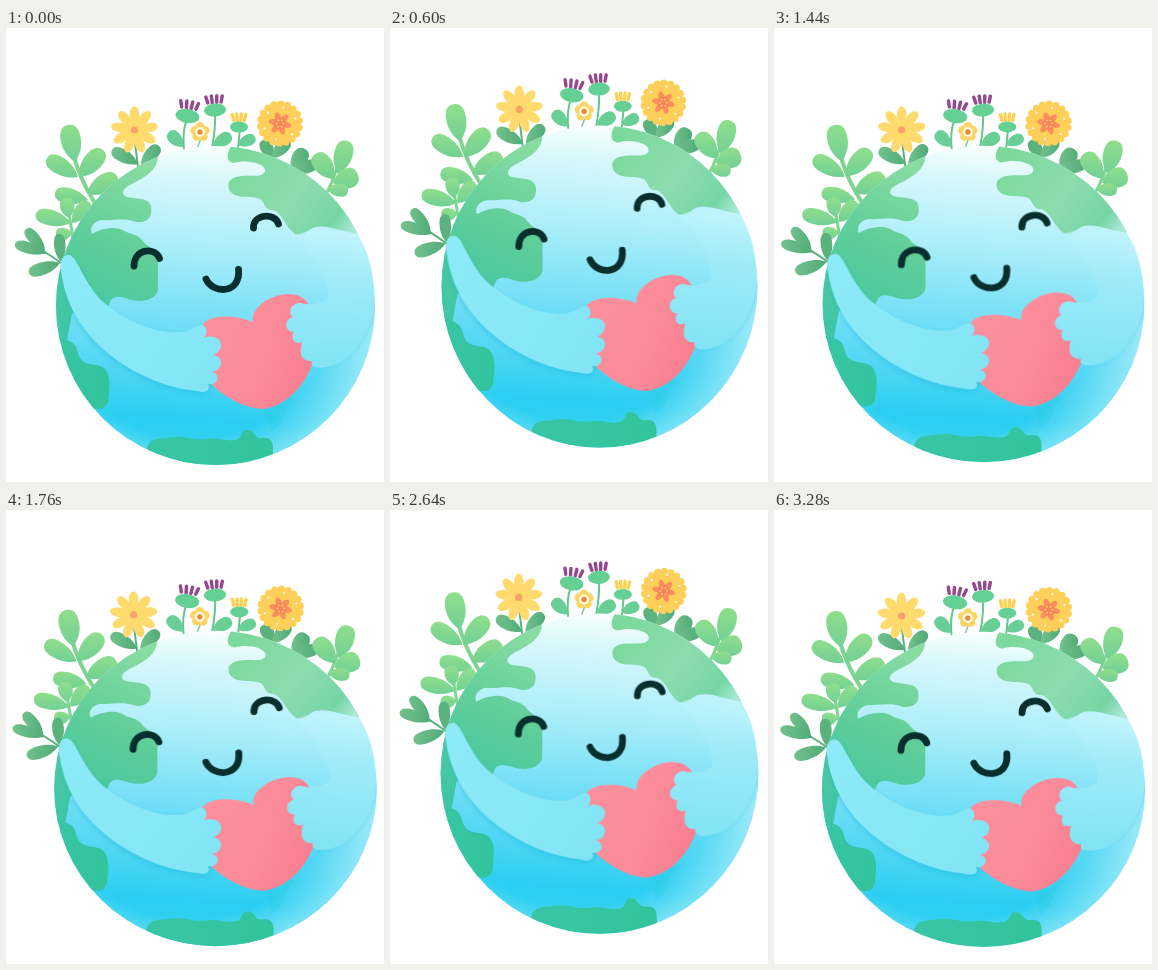
An HTML page for the animation above (3320 ms loop, 378 px wide and 454 px high).

```html
<!DOCTYPE html>
<html lang="en">
<head>
<meta charset="utf-8">
<title>Happy planet</title>
<style>
html, body { margin: 0; width: 100%; height: 100%; overflow: hidden; background: #fff; }
svg { display: block; width: 100vw; height: 100vh; }
</style>
</head>
<body>
<svg viewBox="0 0 378 454">
  <defs>
    <linearGradient id="sea" gradientUnits="userSpaceOnUse" x1="222" y1="118" x2="202" y2="437">
      <stop offset="0" stop-color="#fafffe"/>
      <stop offset=".1" stop-color="#d9f8fb"/>
      <stop offset=".3" stop-color="#b0effa"/>
      <stop offset=".5" stop-color="#80e2f7"/>
      <stop offset=".7" stop-color="#54d7f4"/>
      <stop offset=".86" stop-color="#2bcef1"/>
      <stop offset="1" stop-color="#35d2f1"/>
    </linearGradient>
    <radialGradient id="rim" gradientUnits="userSpaceOnUse" cx="186" cy="258" r="190">
      <stop offset=".8" stop-color="#d8fafd" stop-opacity="0"/>
      <stop offset="1" stop-color="#d8fafd" stop-opacity=".45"/>
    </radialGradient>
    <linearGradient id="westLand" gradientUnits="userSpaceOnUse" x1="140" y1="140" x2="65" y2="300">
      <stop offset="0" stop-color="#88dca2"/>
      <stop offset=".5" stop-color="#5dcd99"/>
      <stop offset="1" stop-color="#40c6a4"/>
    </linearGradient>
    <linearGradient id="eastLand" gradientUnits="userSpaceOnUse" x1="235" y1="130" x2="338" y2="212">
      <stop offset="0" stop-color="#7cd99c"/>
      <stop offset=".5" stop-color="#8cdcb0"/>
      <stop offset=".85" stop-color="#76d5a4"/>
      <stop offset="1" stop-color="#a8e8d4"/>
    </linearGradient>
    <linearGradient id="southLand" x1="0" x2="1" y1="0" y2="0">
      <stop offset="0" stop-color="#39c5a5"/>
      <stop offset="1" stop-color="#32c49d"/>
    </linearGradient>
    <linearGradient id="leftArmFill" gradientUnits="userSpaceOnUse" x1="55" y1="230" x2="210" y2="350">
      <stop offset="0" stop-color="#8eebf8"/>
      <stop offset="1" stop-color="#82e5f6"/>
    </linearGradient>
    <linearGradient id="rightArmFill" gradientUnits="userSpaceOnUse" x1="325" y1="203" x2="318" y2="335">
      <stop offset="0" stop-color="#c4f4fb" stop-opacity=".6"/>
      <stop offset=".35" stop-color="#a0ebf9"/>
      <stop offset="1" stop-color="#82e4f5"/>
    </linearGradient>
    <linearGradient id="love" gradientUnits="userSpaceOnUse" x1="215" y1="310" x2="300" y2="345">
      <stop offset="0" stop-color="#fd8f9c"/>
      <stop offset=".5" stop-color="#fc8b9a"/>
      <stop offset="1" stop-color="#f88091"/>
    </linearGradient>
    <linearGradient id="leaf" x1="0" x2="0" y1="0" y2="1">
      <stop offset="0" stop-color="#90de8c"/>
      <stop offset="1" stop-color="#72d095"/>
    </linearGradient>
    <linearGradient id="darkLeaf" x1="0" x2="1" y1="0" y2="0">
      <stop offset="0" stop-color="#73c18c"/>
      <stop offset="1" stop-color="#50ab79"/>
    </linearGradient>
    <filter id="blur" x="-20%" y="-20%" width="140%" height="140%"><feGaussianBlur stdDeviation="2.5"/></filter>
    <clipPath id="globe"><circle cx="209.5" cy="277.5" r="159.5"/></clipPath>
    <path id="leftArm" d="M55 243C53 231 58 226 64 227C72 231 76 251 94 271C118 293 151 307 177 304C186 302 190 296 197 297C202 300 201 306 198 310C207 306 216 311 215 318C214 323 211 325 207 327C215 328 217 335 213 340C211 343 208 343 205 344C213 345 213 352 209 355C206 357 204 356 202 356C205 362 200 366 191 363C149 359 109 336 85 309C67 289 58 266 55 243Z"/>
    <path id="rightArm" d="M290 207C306 199 334 202 349 206C360 213 369 243 368 277C367 301 348 331 328 337C314 342 303 340 306 333C295 333 293 326 296 314C289 317 284 312 288 304C278 304 278 291 287 289C281 284 286 274 295 275C303 278 314 276 322 271C326 255 310 230 290 207Z"/>
  </defs>
  <g id="planet">
    <g id="plants"></g>
    <circle cx="209.5" cy="277.5" r="159.5" fill="url(#sea)"/>
    <g clip-path="url(#globe)">
      <circle cx="209.5" cy="277.5" r="159.5" fill="url(#rim)"/>
      <path fill="url(#westLand)" d="M60 130L150 112C155 135 151 143 128 155C119 159 114 164 119 168C126 172 142 168 145 178C147 190 141 195 130 194C117 189 108 193 96 192C87 193 83 201 86 206C95 200 110 198 117 202C124 207 130 205 136 212C142 221 151 219 152 232L152 262C149 273 134 275 122 271C108 266 104 270 102 281L66 285L61 313H40V130Z"/>
      <path fill="url(#southLand)" d="M40 306L54 310C66 313 70 315 72 325C76 340 90 334 98 340C105 347 104 358 102 374C98 385 88 380 78 379L40 360Z"/>
      <path fill="url(#eastLand)" d="M231 110C219 124 219 134 228 135C240 131 260 135 259 143C257 150 246 147 236 148C223 149 220 156 224 163C231 172 246 167 254 171C260 175 257 182 267 182C276 185 279 199 289 206C298 210 301 201 309 199C323 196 337 205 356 206L345 130Z"/>
      <path fill="url(#southLand)" d="M141 440V420C144 408 157 411 169 409C181 408 187 413 201 411C214 409 222 415 232 411C237 407 235 401 242 402C250 403 248 411 256 410C263 409 267 412 267 420V440Z"/>
      <path fill="#22c8df" opacity=".28" d="M254 365C256 390 266 390 265 405C281 394 275 384 289 370Z"/>
      <g fill="#18b3d8" opacity=".35" filter="url(#blur)">
        <use href="#leftArm" y="3"/>
        <path d="M305 336C338 342 366 309 370 274L345 260Z"/>
      </g>
    </g>
    <path fill="url(#love)" d="M194 302C197 287 224 285 247 294C244 281 263 267 281 266C301 265 309 280 304 302C306 312 307 322 309 329C303 349 287 376 258 381C240 381 220 370 206 357Z"/>
    <use href="#leftArm" fill="url(#leftArmFill)"/>
    <use href="#rightArm" fill="url(#rightArmFill)"/>
    <g fill="none" stroke="#082f2d" stroke-width="6.8" stroke-linecap="round">
      <path d="M128 238C128 220 150 219 153.500 230.500"/>
      <path d="M247.500 200C247 186 269 184 272.500 196"/>
      <path d="M200 251C207 266.500 235 266 232.500 241.500"/>
    </g>
  </g>
</svg>
<script>
const LOOP = 3320, STEP = 40, HALF = 820;
const PIVOT = { x: 209.5, y: 262 };
// Resting points of the bounce: vertical offset and stretch, one per half beat.
const POSES = [[0, 0], [-23, 0.0115], [2, -0.012], [-16, 0.006], [2, -0.013]];
const planet = document.getElementById('planet');

const ellipse = (x, y, rx, ry, turn, fill) =>
  `<ellipse cx="${x}" cy="${y}" rx="${rx}" ry="${ry}" transform="rotate(${turn} ${x} ${y})" fill="${fill}"/>`;
const dot = (x, y, r, fill) => ellipse(x, y, r, r, 0, fill);
const stem = (d, color, width = 2) =>
  `<path d="${d}" fill="none" stroke="${color}" stroke-width="${width}" stroke-linecap="round"/>`;

// An oval leaf from its base to its tip, with its widest part past the middle.
function leaf(x0, y0, x1, y1, width, fill = 'url(#leaf)') {
  const dx = x1 - x0, dy = y1 - y0, length = Math.hypot(dx, dy);
  const nx = -dy / length * width, ny = dx / length * width;
  const at = (s, side) => `${x0 + dx * s + nx * side} ${y0 + dy * s + ny * side}`;
  return `<path fill="${fill}" d="M${x0} ${y0}C${at(.15, .4)} ${at(.35, .72)} ${at(.62, .72)}
    S${at(1, .45)} ${x1} ${y1}C${at(1, -.45)} ${at(.89, -.72)} ${at(.62, -.72)}S${at(.15, -.4)} ${x0} ${y0}Z"/>`;
}

function ring(x, y, count, radius, draw, phase = 0) {
  let out = '';
  for (let i = 0; i < count; i++) {
    const a = (i + phase) / count * 2 * Math.PI;
    out += draw(x + radius * Math.cos(a), y + radius * Math.sin(a), a * 180 / Math.PI);
  }
  return out;
}

function thistle(x, y, rx, ry, turn, color, bristles) {
  let out = '';
  for (let i = 0; i < bristles; i++) {
    const s = i / (bristles - 1) * 2 - 1;
    out += stem(`M${x + s * rx * .6} ${y - ry - 1}L${x + s * rx * .75} ${y - ry - 8 + Math.abs(s)}`, color, 3.4);
  }
  return `<g transform="rotate(${turn} ${x} ${y})">${out}${ellipse(x, y, rx, ry, 0, '#65d093')}</g>`;
}

function drawPlants() {
  const green = '#7ed590', dark = 'url(#darkLeaf)', deep = '#5bb27f';
  return [
    stem('M66 118Q70 146 92 180', green, 4),
    leaf(69, 134, 62, 97, 14), leaf(73, 149, 97, 122, 13), leaf(72, 149, 41, 130, 12),
    leaf(81, 166, 111, 148, 13), leaf(82, 172, 49, 165, 11),

    stem('M62 180L67 210', green, 3),
    leaf(63, 190, 60, 170, 10), leaf(65, 195, 30, 186, 11), leaf(66, 195, 83, 174, 10), leaf(66, 205, 50, 207, 9),

    stem('M34 221Q47 229 58 237', deep),
    leaf(39, 223, 20, 201, 8, dark), leaf(41, 225, 9, 216, 8, dark),
    leaf(55, 234, 53, 206, 8, deep), leaf(54, 235, 23, 245, 9, dark),

    stem('M129 115L132 139', deep), leaf(132, 136, 106, 122, 9, dark), leaf(135, 137, 153, 118, 9, dark),
    ring(128.5, 102, 9, 15, (x, y, a) => ellipse(x, y, 8.8, 4.8, a, '#ffdb6d'), .75),
    dot(128.5, 102, 9, '#ffdb6d'), dot(128.5, 102, 3.6, '#f6a269'),

    stem('M181 91Q176 103 178 122', '#65c58e'), leaf(177, 119, 163, 104, 9, '#69cf96'),
    thistle(181.5, 88, 12, 7, 9, '#96488f', 4),
    stem('M209 82Q210 99 206 120', '#65c58e'), leaf(207, 118, 225, 107, 9, '#69cf96'),
    thistle(209, 82, 11, 6.5, -4, '#96488f', 4),
    stem('M195 110L191 121', '#7ccf9b', 1.5),
    ring(194, 104, 5, 5.5, (x, y) => dot(x, y, 4.4, '#fbd567'), -.25),
    dot(194, 104, 5, '#fff6d8'), dot(194, 104, 2.6, '#dd8b3f'),
    stem('M234 100L232 120', '#65c58e'), leaf(232, 117, 249, 109, 8, '#69cf96'),
    thistle(233, 99, 9, 5.5, 0, '#fbd253', 4),

    stem('M272 112L267 130', deep), leaf(266, 130, 257, 112, 9, deep), leaf(266, 130, 283, 112, 9, dark),
    ring(274, 95.5, 6, 12, (x, y, a) => ellipse(x, y, 9, 7.5, a, '#fed05a'), .2),
    ring(274, 95.5, 18, 19.5, (x, y) => dot(x, y, 3.6, '#fed05a'), .6),
    ring(274, 95.5, 6, 6, (x, y, a) => ellipse(x, y, 5.5, 3, a, '#fa8f5d'), .2),
    dot(274, 95.5, 6, '#f98559'),
    ring(274, 95.5, 6, 3.5, (x, y) => dot(x, y, .9, '#ffd273')),

    leaf(286, 143, 299, 121, 11, dark), leaf(285, 143, 311, 136, 9, dark),
    stem('M334 128Q330 148 319 168', green, 3),
    leaf(332, 146, 341, 113, 13), leaf(328, 151, 309, 126, 13),
    leaf(327, 155, 352, 147, 14), leaf(321, 161, 342, 163, 9)
  ].join('');
}

function poseAt(time) {
  const beat = Math.min(Math.floor(time / HALF), POSES.length - 2);
  const s = Math.min((time - beat * HALF) / HALF, 1);
  const ease = (1 - Math.cos(Math.PI * s)) / 2;
  return POSES[beat].map((from, i) => from + (POSES[beat + 1][i] - from) * ease);
}

function render(now) {
  const time = Math.floor(now % LOOP / STEP) * STEP;
  const [dy, stretch] = poseAt(time);
  planet.setAttribute('transform',
    `translate(${PIVOT.x} ${PIVOT.y + dy}) scale(${1 - stretch} ${1 + stretch}) translate(${-PIVOT.x} ${-PIVOT.y})`);
}

document.getElementById('plants').innerHTML = drawPlants();
const start = performance.now();
function tick() {
  render(performance.now() - start);
  requestAnimationFrame(tick);
}
tick();
</script>
</body>
</html>
```
